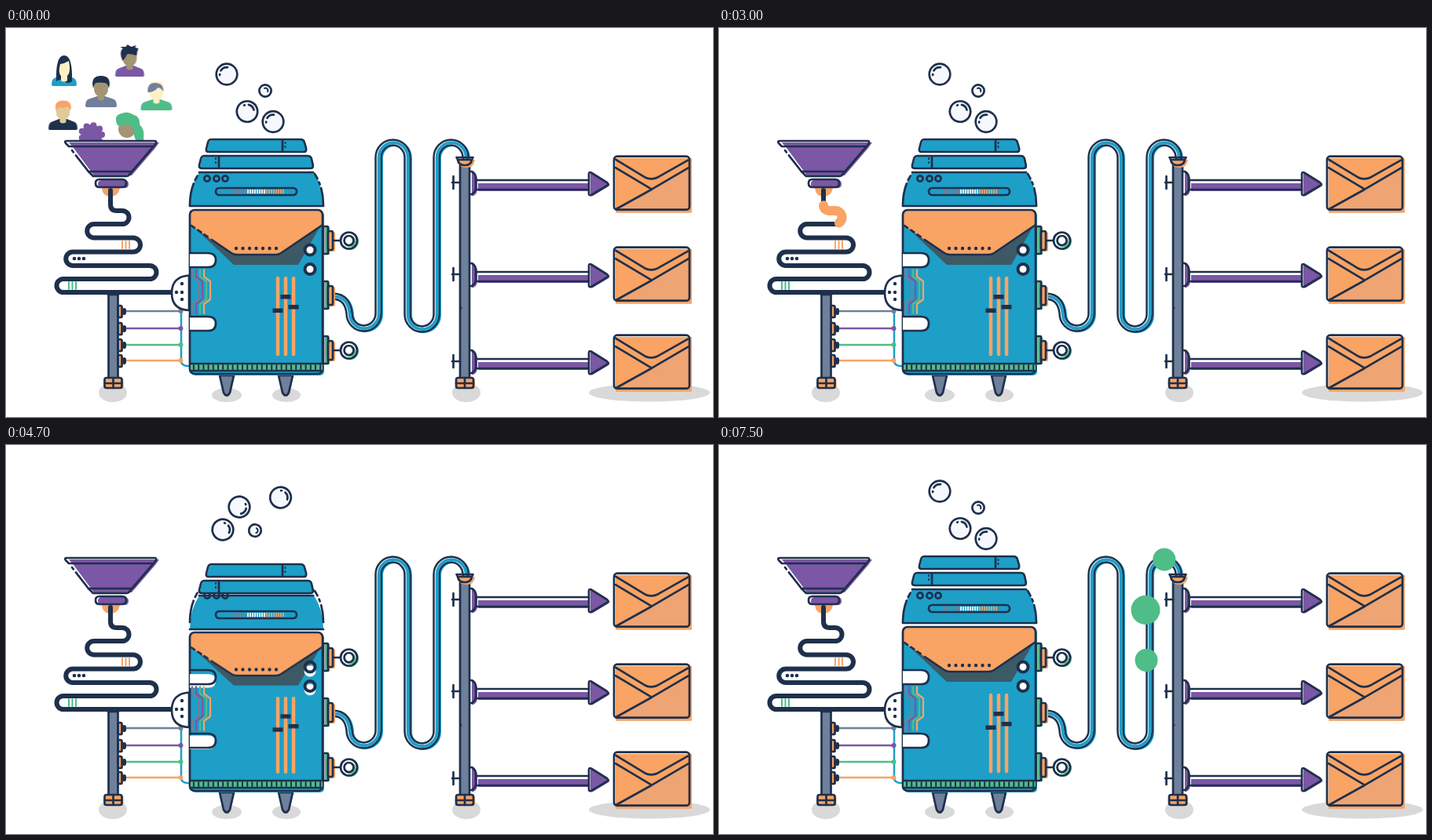
An HTML page that plays this animation: 900x496 px, repeating every 8 s.

```html
<!DOCTYPE html>
<html lang="en">
<head>
<meta charset="utf-8">
<title>Message machine</title>
<style>
html, body { margin: 0; width: 100%; height: 100%; overflow: hidden; background: #fff; }
svg { display: block; width: 100vw; height: 100vh; }
.ink { fill: none; stroke: #1e304c; stroke-width: 2.7; stroke-linecap: round; stroke-linejoin: round; }
.thin { stroke-width: 2; } .thick { stroke-width: 4; }
.navy { fill: #1e304c; } .blue { fill: #1d9fc8; } .purple { fill: #7b57a5; }
.orange { fill: #f9a364; } .green { fill: #4fbd87; } .grey { fill: #6f809a; }
.white { fill: #fff; } .tan { fill: #a39474; } .pale { fill: #fdf0c4; }
.sand { fill: #e0cb98; } .shade { fill: #3c5a66; } .peach { fill: #eea473; }

.person, .flow, .ball, .squash, .fill { animation: 8s step-end infinite; }
.person { animation-name: fall; }
.flow { animation-name: flow; fill: none; stroke: #f9a364; stroke-width: 12; stroke-linecap: round; stroke-dasharray: 40 2000; }
.ball { animation-name: roll; fill: none; stroke: #4fbd87; stroke-width: var(--w); stroke-linecap: round; stroke-dasharray: .1 2000; }
.squash { animation-name: squash; transform-origin: 0 441px; }
.fill { animation-name: fill; }

@keyframes fall {
  0% { transform: none; opacity: 1; }
  6.25% { transform: translate(calc(var(--dx) * .25), calc(var(--dy) * .25)); }
  12.5% { transform: translate(calc(var(--dx) * .58), calc(var(--dy) * .58)); }
  18.75% { transform: translate(var(--dx), var(--dy)); }
  25% { transform: translate(var(--dx), calc(var(--dy) * 1.35)); }
  31.25%, 100% { transform: translate(var(--dx), var(--dy)); opacity: 0; }
}
@keyframes flow {
  0%, 47.5%, 100% { stroke-dashoffset: 500px; }
  37.5% { stroke-dashoffset: -19px; }
  40% { stroke-dashoffset: -190px; }
  42.5% { stroke-dashoffset: -360px; }
  45% { stroke-dashoffset: -535px; }
}
@keyframes fill {
  0%, 53.75%, 100% { opacity: 0; }
  47.5% { opacity: 1; }
}
@keyframes squash {
  0%, 55%, 57.5%, 60%, 100% { transform: none; opacity: var(--rest, 1); }
  53.75%, 56.25%, 58.75% { transform: var(--press, none); opacity: var(--jolt, 1); }
}
@keyframes roll {
  0%, 100% { stroke-dashoffset: 500px; }
  62.5% { stroke-dashoffset: calc(var(--lag) - 17px); stroke-width: 24px; }
  68.75% { stroke-dashoffset: calc(var(--lag) - 181px); stroke-width: var(--w); }
  75% { stroke-dashoffset: calc(var(--lag) - 345px); }
  81.25% { stroke-dashoffset: calc(var(--lag) - 509px); }
  87.5% { stroke-dashoffset: calc(var(--lag) - 673px); }
  93.75% { stroke-dashoffset: calc(var(--lag) - 837px); }
}
</style>
</head>
<body>
<svg id="stage" viewBox="0 0 900 496" preserveAspectRatio="none"></svg>
<script>
const C = { navy: '#1e304c', blue: '#1d9fc8', purple: '#7b57a5', orange: '#f9a364', green: '#4fbd87', grey: '#6f809a' };
const path = (d, cls = 'ink', extra = '') => `<path d="${d}" class="${cls}" ${extra}/>`;
const rect = (x, y, w, h, cls, rx = 0) => `<rect x="${x}" y="${y}" width="${w}" height="${h}" rx="${rx}" class="${cls}"/>`;
const dot = (x, y, r, cls = 'navy') => `<circle cx="${x}" cy="${y}" r="${r}" class="${cls}"/>`;
const stroke = (d, color, width, extra = '') =>
  `<path d="${d}" fill="none" stroke="${color}" stroke-width="${width}" stroke-linecap="round" stroke-linejoin="round" ${extra}/>`;
const dashed = (d, dashes, cls = 'ink') => path(d, cls, `stroke-dasharray="${dashes}"`);
const at = (x, y, body) => `<g transform="translate(${x} ${y})">${body}</g>`;
const each = (list, draw) => list.map(draw).join('');
const range = (n, draw) => each([...Array(n).keys()], draw);
const pressed = (press, body) => `<g class="squash" style="--press:${press}">${body}</g>`;
// Flat colour slightly out of register with its outline
const print = (d, cls, dx = 2, dy = 1) => path(d, cls, `transform="translate(${dx} ${dy})"`) + path(d);

const PIPE = 'M133 207V225q0 8 8 8H148a8.5 8.5 0 0 1 0 17H112a8.75 8.75 0 0 0 0 17.5H162a9 9 0 0 1 0 18H85' +
  'a8.75 8.75 0 0 0 0 17.5H183a8.5 8.5 0 0 1 0 17H73a8.5 8.5 0 0 0 0 17H213';
const HOSE = 'M417 342q18 1 20 22a18.5 19 0 0 0 37 0V165a18.5 19 0 0 1 37 0V365a18.5 19 0 0 0 37 0V165a18.5 19 0 0 1 37 0';

const shadows = () => each([[136, 465, 18, 12], [281, 468, 19, 9], [357, 468, 18, 9], [586, 465, 18, 12], [819, 465, 77, 11.5]],
  ([x, y, rx, ry]) => `<ellipse cx="${x}" cy="${y}" rx="${rx}" ry="${ry}" fill="#d9d9d9"/>`);

const shoulders = (w, cls) => path(`M${-w} 23Q${-w} 15 ${6 - w} 14L-5 11H5L${w - 6} 14Q${w} 15 ${w} 23Q${w} 25 ${w - 3} 25H${3 - w}Q${-w} 25 ${-w} 23Z`, cls);
const face = cls => path('M-9-6Q-9-12 0-12T9-6V1Q9 8 4 11V15Q0 18-4 15V11Q-9 8-9 1Z', cls);
const person = (x, y, dx, dy, body) => at(x, y, `<g class="person" style="--dx:${dx}px;--dy:${dy}px">${body}</g>`);
const people = () => '<g clip-path="url(#mouth)">' +
  person(121, 76, 8, 90, shoulders(20, 'grey') + face('tan') + path('M-10 1Q-14-15 0-15T10 1Q9-5 5-6Q-3-7-7-6Q-9-4-10 1Z', 'navy')) +
  person(109, 136, 4, 50, dot(0, 0, 13, 'purple') + range(9, i => dot(13 * Math.cos(i * .7), 12 * Math.sin(i * .7), 4, 'purple'))) +
  person(155, 125, -8, 50, dot(-1, 4, 11, 'tan') +
    path('M-14-3Q-18-14-8-16Q0-20 8-14Q16-12 15-2Q22 5 20 15Q22 22 14 23Q6 14 8 4Q4-3-4-2Q-11 3-14-3Z', 'green')) +
  person(157.5, 37, -22, 103, shoulders(18.5, 'purple') + face('tan') +
    path('M-9 5Q-14-6-9-11L-12-13L-5-13L-3-16L2-13L8-15L7-12L11-11Q9-6 9-2Q2-4-3-4Q-6 2-9 5Z', 'navy')) +
  person(74, 49, 31, 77, shoulders(16, 'blue') + path('M-10 19Q-11-14 0-14T10 19Q5 23 0 19T-10 19Z', 'navy') +
    path('M-5-3Q1-4 6-7Q9 8 4 12V18Q0 21-4 18V12Q-8 8-5-3Z', 'pale')) +
  person(191.5, 80, -33, 61, shoulders(20, 'green') + face('pale') + path('M-11 2Q-12-10-2-10Q9-10 9 1Q5-4 2-4Q-3 2-11 2Z', 'grey')) +
  person(72.5, 105, 35, 30, shoulders(18.5, 'navy') + face('sand') + path('M-9 0Q-12-12 0-12.5T10 0L6-5Q0-2-5-4Z', 'orange')) +
  '</g>';

const funnel = () =>
  path('M122 204H145Q143 215 133 215T122 204Z', 'orange') + stroke(PIPE, C.navy, 6) +
  path('M80 146H195L190 153L160 188H112L86 153Z', 'purple') +
  path('M77 144H189Q192 144 191 147L188 151H80L76 147Q74 144 77 144Z') +
  path('M187 152L157 187Q156 189 153 189H111L105 183H160') +
  dashed('M84 156L105 183', '3 5 40') +
  print('M119 193H148Q153 193 153 198T148 203H119Q114 203 114 198T119 193Z', 'purple', 3, 1) +
  each([148, 152.5, 157], x => stroke(`M${x} 272V281`, C.orange, 2)) +
  each([87, 93, 99], x => dot(x, 294, 2.3)) +
  each([80, 84.5, 89], x => stroke(`M${x} 324V333`, C.green, 2)) +
  path(PIPE, 'flow');

const foot = x => at(x, 446, rect(1, 1, 23, 13, 'orange', 2) + rect(0, 0, 22, 13, 'ink', 2.5) + path('M0 7H22M11 0V13'));
const post = (x, y) => rect(x, y, 12, 447 - y, 'grey') + path(`M${x} ${y}V446M${x + 12} ${y}V446`) + foot(x - 5);

const wiring = () => post(130.5, 340) + path('M130 340H143') +
  stroke('M223 361V424Q223 431 232 431', C.blue, 2.5) +
  each([[361, C.grey], [383, C.purple], [404, C.green], [424, C.orange]], ([y, c]) =>
    stroke(`M152 ${y}H221`, c, 2.5) + `<circle cx="222.5" cy="${y}" r="3" fill="${c}"/>` +
    rect(144, y - 6, 5, 15, 'orange', 1) + rect(142.5, y - 7, 5, 15, 'ink', 2) + rect(148, y - 4, 5, 9, 'navy', 3));

const intake = () => {
  const half = 'M233 315.5Q211 317 211 338T233 360Z';
  return path(half, 'white') + each([[224, 326], [217, 337], [224, 337], [224, 346]], ([x, y]) => dot(x, y, 2.2)) +
    path(half, 'fill orange') + path(half);
};

const lids = () => pressed('translateY(10px)',
  print('M262 142H375Q379 142 380 146L382 153Q383 158 379 158H258Q254 158 255 154L257 146Q258 142 262 142Z', 'blue', 1, 1) +
  path('M352 143V157') + dashed('M355.5 146V156', '1 4', 'ink thin') +
  print('M253 163H384Q388 163 389 167L390.5 174Q392 179 387 179H250Q245 179 246 175L248 167Q249 163 253 163Z', 'blue', 1, 1) +
  path('M271 164V178') + dashed('M267 166V176', '1 4', 'ink thin'));

const dome = () => {
  const tick = i => stroke(`M${287 + i * 3} 206.5V210.5`, i < 7 ? C.grey : i < 15 ? '#fff' : C.orange, 1.7);
  return pressed('translateY(8px)',
    path('M246 184H392Q404 202 404 227H234Q234 202 246 184Z', 'blue') +
    path('M246 184H391M234 227H404') + rect(267, 204, 103, 9, 'ink', 4.5) + range(23, tick)) +
    dashed('M234 226Q234 202 246 185', '28 5 6 5 30') + dashed('M393 186Q404 203 404 226', '7 5 3 5 60') +
    each([256, 268, 279], x => dot(x, 192, 3.6, 'ink'));
};

const slider = (x, y) => stroke(`M${x} 319V416`, C.orange, 4.5) + rect(x - 6.5, y - 2.5, 13, 5.5, 'navy');
const notch = y => `M234 ${y}H257Q267 ${y} 267 ${y + 9}T257 ${y + 18}H234`;
const knobs = [283, 307.5];
const body = () => {
  const leg = x => print(`M${x} 443L${x + 5} 465Q${x + 9} 472 ${x + 13} 465L${x + 18} 443Z`, 'grey', 1, 0);
  return leg(272) + leg(347) +
    pressed('scaleY(.967)',
      rect(236, 234, 169, 209, 'blue', 5) + rect(234, 232, 169, 209, 'blue', 6) +
      path('M236 251L290 302H372L401 251Z', 'shade') +
      path('M240 233H398Q402 233 402 238V252L350 287Q347 289 343 289H294Q290 289 287 287L235 252V238Q235 233 240 233Z', 'orange') +
      path('M403 251L350 287Q347 289 343 289H294Q290 289 287 287L262 270') +
      dashed('M236 252L258 267', '5 5') +
      range(7, i => dot(293 + i * 8.5, 281, 2.2)) +
      rect(234, 232, 169, 209, 'ink', 6) +
      each(knobs, y => dot(387, y, 7.5, 'white')) +
      each([287, 368], y => path(notch(y), 'white')) +
      slider(346, 360) + slider(356, 342.5) + slider(366, 355.5)) +
    each(knobs, y => dot(387, y, 6.5, 'ink thick')) +
    each([287, 368], y => path(notch(y))) +
    each([C.grey, C.purple, C.green, C.orange], (c, i) =>
      stroke(`M${237 + i * 5} 308V317L${245 + i * 5} 323V346L${237 + i * 5} 352V364`, c, 2.2)) +
    rect(235, 428, 168, 9, 'green') + path('M235 428H402M235 437H402') +
    range(27, i => path(`M${239 + i * 6.2} 430V435`, 'ink thin'));
};

const port = (y, knob) => at(0, y,
  rect(406, -17, 6, 35, 'green', 1) + rect(404, -18, 6, 35, 'ink', 1) +
  rect(411, -11, 8, 25, 'orange', 2) + rect(410, -12, 6, 24, 'ink', 2) +
  (knob ? path('M417 0H425') + dot(438, 1, 11, 'green') + dot(436.5, 0, 10.5, 'white') +
    dot(437.5, 1, 7.5, 'green') + dot(436.5, 0, 5.5, 'white') + dot(436.5, 0, 10.5, 'ink') + dot(436.5, 0, 6, 'ink') : ''));

const hose = () => stroke(HOSE, C.blue, 8, 'transform="translate(2 1)"') + stroke(HOSE, C.navy, 9.5) +
  stroke(HOSE, '#fff', 4.5) + stroke(HOSE, C.blue, 3.8, 'transform="translate(.6 .2)"');

const arrow = y => at(0, y,
  path('M568-2H578M569.5-10V-6M569.5 2V6M569.5-10V6') +
  print('M591-16H593Q598-13 598-8V5Q598 10 593 13H591', 'purple', 2, 2) +
  rect(601, -1, 142, 10, 'purple') + path('M599-5H742M599 7H742') +
  print('M742-13Q742-16 745-14.5L765-2Q768 0 765 2L745 14Q742 15 742 12Z', 'purple', 2, 1));

const outlet = () => post(578, 175) + dot(579, 357, 1.5) + each([199, 316, 427], arrow) +
  path('M576 168H597Q596 178 586 178T576 168Z', 'orange') +
  path('M573.5 165H594.5L593 168H575ZM575 168Q576 175 584 175T593 168');

const envelope = y => at(774, y,
  rect(2, 2, 97, 70, 'orange', 1) + path('M97 16V69H5L48 43Z', 'peach') +
  rect(0, 0, 96, 68, 'ink', 4) +
  path('M2 4L39 26.5Q47 31 56 26.5L94 5M2 14.5L48 42L95 14.5M48 42L3 67'));

const bubble = (x, y, r, turn) => at(x, y, `<g transform="rotate(${turn})">` +
  dot(0, 0, r, 'ink" style="fill:#f6f8fd') +
  dashed(`M${4.5 - r} 1A${r - 4.5} ${r - 4.5} 0 0 1 1 ${4.5 - r}`, r > 10 ? '1 5 30' : 'none', r > 10 ? 'ink' : 'ink thin') + '</g>');
const bubbles = () =>
  `<g class="squash" style="--rest:1;--jolt:0">${bubble(281, 59, 13.3, 0) + bubble(330, 80, 7.6, 90) + bubble(307, 106.5, 13.2, 70) + bubble(340, 119.5, 13.3, 0)}</g>` +
  `<g class="squash" style="--rest:0;--jolt:1">${bubble(276, 108, 13.3, 110) + bubble(297, 79, 13.3, 160) + bubble(317, 109, 7.8, 140) + bubble(349.5, 67, 13.3, 100)}</g>`;

const ball = (lag, width, dx) => path(HOSE, 'ball', `style="--lag:${lag}px;--w:${width}px" transform="translate(${dx} 0)"`);

document.getElementById('stage').innerHTML =
  '<defs><clipPath id="mouth"><path d="M0 0H900V144H0Z"/></clipPath></defs>' +
  shadows() + people() + funnel() + wiring() + intake() + bubbles() + dome() + lids() + body() +
  hose() + port(271, true) + port(341, false) + port(411, true) + outlet() + each([163.7, 279.7, 391.7], envelope) +
  ball(0, 29, 0) + ball(75, 37, -5) + ball(139, 29, -4);
</script>
</body>
</html>
```
